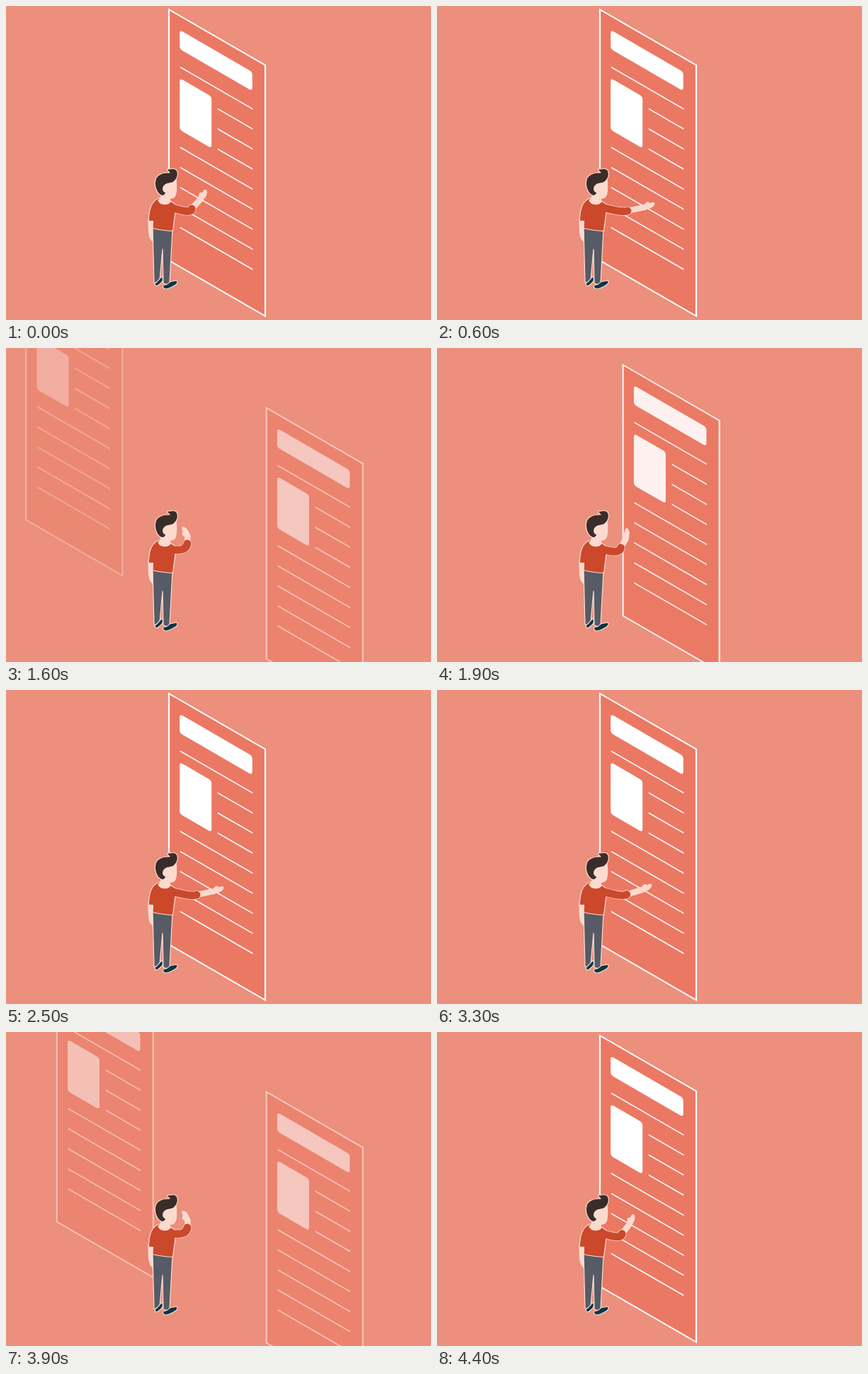
Animation of 600x443 px, one loop 4.5 s. Source, as an HTML page:

```html
<!DOCTYPE html>
<html lang="en">
<head>
<meta charset="utf-8">
<title>Swiping pages</title>
<style>
  html, body { margin: 0; width: 100%; height: 100%; overflow: hidden; background: #ec8f7c; }
  svg { display: block; width: 100%; height: 100%; }
  .sheet { fill: #eb7863; stroke: #fff; stroke-width: 2.2; }
  .block { fill: #fff; }
  .rules { fill: none; stroke: #fff; stroke-width: 1.8; stroke-linecap: round; }
  .person path { stroke: #f9ddd4; stroke-width: 1.2; stroke-linejoin: round; }
  .person .skin { fill: #fcdacd; }
  .person .shirt { fill: #cb482b; }
  .person .trousers { fill: #565b66; }
  .person .shoe { fill: #0d3643; }
  .person .hair { fill: #3a2d29; }
  .person .limb { fill: none; stroke-linecap: round; }
  .person .forearm-edge { stroke-width: 8.4; }
  .person .forearm { stroke: #fcdacd; stroke-width: 7; }
  .person .sleeve-edge { stroke-width: 12.2; }
  .person .sleeve { stroke: #cb482b; stroke-width: 10.8; }
</style>
</head>
<body>
<svg viewBox="0 0 600 443" preserveAspectRatio="none">
  <defs>
    <g id="page" transform="translate(230 5) skewY(30)">
      <rect class="sheet" width="136" height="354"/>
      <rect class="block" x="15.2" y="20" width="102.5" height="27" rx="4"/>
      <rect class="block" x="15.2" y="88" width="45" height="73" rx="4"/>
      <path id="rules" class="rules"/>
    </g>
  </defs>
  <use id="leaving" href="#page"/>
  <use id="arriving" href="#page"/>

  <g class="person">
    <path class="skin" d="M201 300L201.500 318C202 325 204 330 207 332L209 330L208 300Z"/>
    <path class="trousers" d="M207 312L235 315L231 391C228 393 225 393 222 391L221 343L217 387C215 390 212 391 209 390Z"/>
    <path class="shoe" d="M210 391C214 390 217 384 220 381.500C222 384 222 388 219 390.500C216 393 214 396 211 395Z"/>
    <path class="shoe" d="M222 394C227 394 230 391 232 388.500C235 389 238 387 241 387.500C243 389 242 391 240 393C234 397 229 400 224 399C222 398 221 396 222 394Z"/>
    <path id="forearmEdge" class="limb forearm-edge"/>
    <path id="hand" class="skin" d="M-1 -3C3 -3 2 -6 6 -6C8 -5 7 -3.500 9 -3.500C12 -4.500 15 -4 14.500 -2C13 2 8 3.500 -1 3Z"/>
    <path id="forearm" class="limb forearm"/>
    <path id="sleeveEdge" class="limb sleeve-edge"/>
    <path class="shirt" d="M216 271C208 274 204 281 202.500 290L201 303L207.500 303.500L207 313.500C216 316 226 317 235.500 317.500L239 291L238 279L232 275Z"/>
    <path id="sleeve" class="limb sleeve"/>
    <path class="skin" d="M223 251L240 244C241 254 241 265 238 269C236 272 233 271 231 271L232 276C227 282 217 280 215 274C218 273 219 270 219 266Z"/>
    <path class="hair" d="M220 267.500C212 265 209 253 211 245C213 238 220 235 231 235C228 233 227 231 229 229.500C233 231.500 236 227 241 231.500C244 237 242 244 237 248C233 251 229 249 225 252C220 256 221 262 226 263C225 266 223 268 220 267.500Z"/>
  </g>
</svg>
<script>
const LOOP = 4500, STEP = 100, TRAVEL = 288;
const SLOPE = Math.tan(Math.PI / 6);
const LEAD = 100;      // the arm starts bending this long before the page moves
const ARRIVED = 1100;  // the next page is in place

const swipes = [
  { start: 1000, exit: 820, settle: 900, decay: 1 },
  { start: 3300, exit: 1015, settle: 1200, decay: 1.3 }
];

const reach = { bend: [262, 292], cuff: [269, 289], wrist: [293, 284], turn: [-12] };
const raise = { bend: [261, 294], cuff: [262, 286], wrist: [274, 272], turn: [-50] };
const fold  = { bend: [254, 288], cuff: [256, 276], wrist: [256.5, 266], turn: [-108] };
const RAISED = 0.42;   // how far the arm is folded in the raised pose

const $ = id => document.getElementById(id);
const clamp = x => Math.min(1, Math.max(0, x));
const smooth = x => x * x * (3 - 2 * x);
const ramp = (t, from, length) => clamp((t - from) / length);
const mix = (a, b, k) => a.map((v, i) => v + (b[i] - v) * k);

function drawRules() {
  let d = '';
  for (let row = 0; row < 9; row++) {
    const besidePicture = row >= 1 && row <= 3;
    d += `M${besidePicture ? 69.5 : 16.5} ${72 + row * 28.3}H117.5`;
  }
  $('rules').setAttribute('d', d);
}

// Distance -1..1 slides a page along the slope and fades it out.
function placePage(id, distance) {
  const x = distance * TRAVEL;
  $(id).setAttribute('transform', `translate(${x} ${x * SLOPE})`);
  $(id).setAttribute('opacity', clamp(1 - Math.abs(distance) * 1.03));
}

function poseArm(folded) {
  const [from, to, k] = folded < RAISED
    ? [reach, raise, folded / RAISED]
    : [raise, fold, (folded - RAISED) / (1 - RAISED)];
  const at = part => mix(from[part], to[part], k);
  const cuff = at('cuff'), wrist = at('wrist');
  for (const id of ['sleeve', 'sleeveEdge']) $(id).setAttribute('d', `M233 284Q${at('bend')} ${cuff}`);
  for (const id of ['forearm', 'forearmEdge']) $(id).setAttribute('d', `M${cuff}L${wrist}`);
  $('hand').setAttribute('transform', `translate(${wrist}) rotate(${at('turn')})`);
}

function draw(t) {
  const [first, second] = swipes;
  const swipe = t >= first.start - LEAD && t < second.start - LEAD ? first : second;
  const s = (t - swipe.start + LEAD + LOOP) % LOOP - LEAD;

  const sliding = s >= 0 && s < ARRIVED;
  placePage('leaving', sliding ? -(ramp(s, 0, swipe.exit) ** 1.14) : 0);
  placePage('arriving', sliding ? (1 - ramp(s, 300, 800)) ** 1.57 : 1);

  const folding = smooth(ramp(s, -LEAD, 600));
  const unfolding = (1 - ramp(s, 600, swipe.settle)) ** swipe.decay;
  poseArm(folding * unfolding);
}

let start;
function tick(now) {
  start ??= now;
  draw(Math.floor((now - start) % LOOP / STEP) * STEP);
  requestAnimationFrame(tick);
}
drawRules();
draw(0);
requestAnimationFrame(tick);
</script>
</body>
</html>
```
